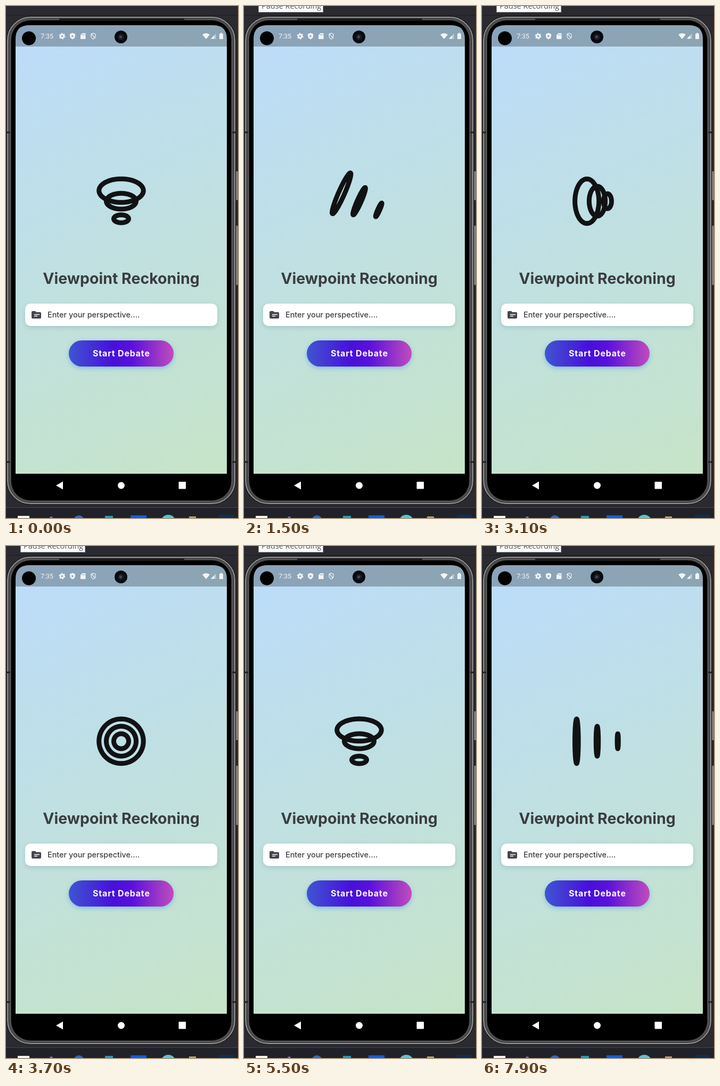
An HTML page for the animation above (8 s loop, 436 by 960 pixels).

```html
<!DOCTYPE html>
<html lang="en">
<head>
<meta charset="utf-8">
<title>Phone loader</title>
<style>
  html, body { margin: 0; width: 100%; height: 100%; overflow: hidden; background: #2a2a30; }
  svg { display: block; }
  text { font-family: Inter, "Open Sans", sans-serif; }
  .status { fill: #f1f4f7; }
  .status text { font: 12.5px Roboto, sans-serif; }
  .field { filter: drop-shadow(0 3px 4px rgba(60, 110, 130, .22)); }
  .button { filter: drop-shadow(0 3px 4px rgba(70, 150, 235, .5)); }
  .tip { font: 14.5px "Open Sans", sans-serif; fill: #55585c; }
</style>
</head>
<body>
<svg width="436" height="960" viewBox="0 0 436 960">
  <defs>
    <linearGradient id="sky" gradientUnits="userSpaceOnUse" x1="18" y1="36" x2="415" y2="877">
      <stop stop-color="#bbdcfb"/><stop offset="1" stop-color="#c6e4c7"/>
    </linearGradient>
    <linearGradient id="violet">
      <stop stop-color="#3f55d0"/><stop offset=".42" stop-color="#480fdc"/>
      <stop offset=".6" stop-color="#5a10dc"/><stop offset="1" stop-color="#c04cbc"/>
    </linearGradient>
    <clipPath id="screen"><path d="M18 877V62Q18 36 44 36H389Q415 36 415 62V877Z"/></clipPath>
  </defs>

  <!-- desktop -->
  <path d="M0 17.5H436" stroke="#1c1c20"/>
  <rect y="940" width="436" height="20" fill="#212229"/>
  <path d="M0 940.5H436" stroke="#46474c"/>
  <rect x="22" y="956" width="22" height="4" fill="#f4f4f4"/>
  <circle cx="85" cy="960" r="3" fill="#7d62b8"/>
  <circle cx="137" cy="965" r="10" fill="#3568c8"/>
  <rect x="186" y="956" width="15" height="4" fill="#259bb5"/>
  <rect x="234" y="955" width="30" height="5" fill="#075dfc"/>
  <circle cx="305" cy="968" r="14" fill="#55c5d5"/>
  <rect x="344" y="957" width="13" height="3" fill="#b99e66"/>
  <rect x="400" y="954" width="28" height="6" fill="#0b2f54"/>

  <!-- phone body -->
  <path d="M434 310V364M434 412V523" stroke="#929294" stroke-width="3"/>
  <rect x="1" y="19" width="431" height="916" rx="45" fill="#111"/>
  <rect x="3" y="21" width="427" height="912" rx="43" fill="#48484a" stroke="#949494" stroke-width="2"/>
  <rect x="8.5" y="25.500" width="416" height="903" rx="38" fill="#1a1a1b" stroke="#6e6e70"/>
  <path d="M2 237H8M2 855H8M425 237H431M425 855H431" stroke="#222" stroke-width="3"/>
  <path d="M100 25H335" stroke="#1a1a1b" stroke-width="3"/>
  <rect x="10.500" y="28" width="412" height="898" rx="35"/>

  <!-- screen -->
  <g clip-path="url(#screen)">
    <rect x="18" y="36" width="397" height="841" fill="url(#sky)"/>
    <rect x="18" y="36" width="397" height="40" opacity=".26"/>
  </g>
  <circle cx="43" cy="60.500" r="13"/>
  <circle cx="216" cy="58" r="12" fill="#08090b"/>
  <circle cx="216" cy="58" r="6" fill="#181c28"/>
  <circle cx="215.500" cy="58" r="2.500" fill="#3c4a67"/>

  <g class="status">
    <text x="65" y="61">7:35</text>
    <circle cx="105.500" cy="56.500" r="3.200" fill="none" stroke="#f1f4f7" stroke-width="2.800"/>
    <circle cx="105.500" cy="56.500" r="5" fill="none" stroke="#f1f4f7" stroke-width="2" stroke-dasharray="2.620"/>
    <path fill-rule="evenodd" d="M125 50.500L130 52.500V56Q130 60.500 125 62.500Q120 60.500 120 56V52.500ZM123.500 54V59L127.500 56.500Z"/>
    <path d="M143.500 51H149.500V62H140V54.500Z"/>
    <path d="M143.500 53V55M145.500 53V55M147.500 53V55" stroke="#8ba3b7"/>
    <path d="M164 51L168 52.700V56Q168 60 164 62Q160 60 160 56V52.700ZM160 52L168 60.500" fill="none" stroke="#f1f4f7" stroke-width="1.200"/>
    <path d="M369 53.500Q376 48.500 383 53.500L376 62Z"/>
    <path d="M385 61.500L394.500 51.500V61.500Z" opacity=".5"/>
    <path d="M385 61.500L391 55.200V61.500Z"/>
    <path d="M401 52H403V50.500H406V52H408V62H401Z"/>
  </g>

  <g id="loader" fill="none" stroke="#111213" stroke-width="9" stroke-linejoin="round"></g>

  <text x="216.5" y="521" text-anchor="middle" font-size="28.5" font-weight="700" fill="#3a3d40">Viewpoint Reckoning</text>

  <rect class="field" x="36" y="558" width="361" height="42" rx="10" fill="#fff"/>
  <path d="M50 572H55L57 574H64Q66 574 66 576V584Q66 586 64 586H50Q48 586 48 584V574Q48 572 50 572Z" fill="#46454d"/>
  <path d="M53 578.500H63M53 581.500H59" stroke="#fff" stroke-width="1.500"/>
  <text x="78" y="584" font-size="14.400" font-weight="500" fill="#3c3e42">Enter your perspective....</text>

  <rect class="button" x="118" y="627" width="197" height="49" rx="24.500" fill="url(#violet)"/>
  <text x="216.900" y="657" text-anchor="middle" font-size="16" font-weight="700" letter-spacing=".8" fill="#fff">Start Debate</text>

  <g fill="#fff">
    <path d="M94 899L107 891.500V906.500Z"/>
    <circle cx="216.500" cy="899" r="6.500"/>
    <rect x="324.500" y="892" width="13.500" height="13.500" rx="1"/>
  </g>

  <g id="tooltip">
    <rect x="27.500" y="-12" width="121" height="23.500" fill="#fafafa" stroke="#a5a5a8"/>
    <text class="tip" x="33" y="5">Pause Recording</text>
  </g>
</svg>
<script>
const LOOP = 8000, FRAME = 100;
const INTERVAL = 1700, MOVE = 1232, LEAD = 933, TOOLTIP_AT = 500;
const RADII = [41.75, 28, 14];

// Three views of the same stack of rings.
const FRONT = { offsets: [0, 0, 0], squash: 1, turn: 0 };
const TILTED = { offsets: [-21, 0, 35], squash: .5, turn: 0 };
const SIDE = { offsets: [-42, 0, 42], squash: 0, turn: -90 };
const MOVES = [[FRONT, TILTED], [TILTED, SIDE], [SIDE, { ...FRONT, turn: -90 }]];

const loader = document.getElementById('loader');
const tooltip = document.getElementById('tooltip');
const rings = RADII.map(() =>
  loader.appendChild(document.createElementNS('http://www.w3.org/2000/svg', 'path')));

const mix = (a, b, p) => a + (b - a) * p;
const easeInOut = x => x < .5 ? 4 * x ** 3 : 1 - 4 * (1 - x) ** 3;

// A polyline keeps round ends when the ellipse collapses to a bar.
function ellipsePath(cy, rx, ry) {
  const points = Array.from({ length: 72 }, (_, i) => {
    const a = i * Math.PI / 36;
    return `${(rx * Math.cos(a)).toFixed(2)} ${(cy + ry * Math.sin(a)).toFixed(2)}`;
  });
  return `M${points.join('L')}Z`;
}

function draw(t) {
  const elapsed = t + LEAD;
  const [from, to] = MOVES[Math.floor(elapsed / INTERVAL) % MOVES.length];
  const p = easeInOut(Math.min(1, elapsed % INTERVAL / MOVE));
  const squash = mix(from.squash, to.squash, p);
  rings.forEach((ring, i) => ring.setAttribute('d',
    ellipsePath(mix(from.offsets[i], to.offsets[i], p), RADII[i], RADII[i] * squash)));
  loader.setAttribute('transform', `translate(216.5 366) rotate(${mix(from.turn, to.turn, p)})`);
  tooltip.style.display = t < TOOLTIP_AT ? 'none' : '';
}

const start = performance.now();
function tick() {
  const t = (performance.now() - start) % LOOP;
  draw(Math.floor(t / FRAME) * FRAME);
  requestAnimationFrame(tick);
}
tick();
</script>
</body>
</html>
```
